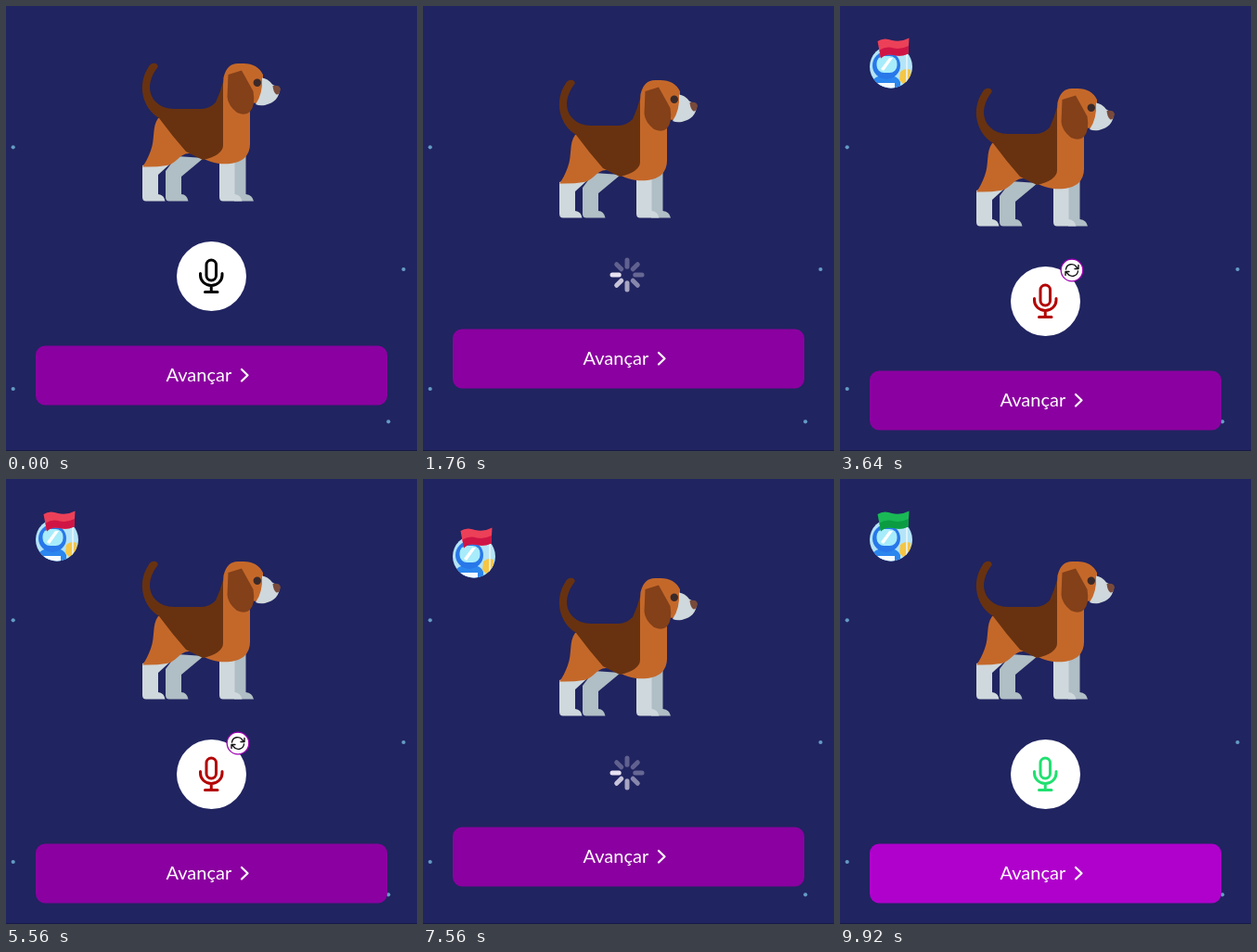
An HTML page for the animation above (10000 ms loop, 443 px wide and 480 px high).

```html
<!DOCTYPE html>
<html lang="pt">
<head>
<meta charset="utf-8">
<title>Avançar</title>
<style>
  html, body { margin: 0; width: 100%; height: 100%; overflow: hidden; background: #202460; }
  svg { display: block; width: 443px; height: 480px; }
  text { font: 20px Lato, "Open Sans", sans-serif; fill: #fff; }
  .line { fill: none; stroke-linecap: round; stroke-linejoin: round; }
</style>
</head>
<body>
<svg viewBox="0 0 443 480">
  <rect width="443" height="480" fill="#202460"/>
  <rect y="479" width="443" height="1" fill="#171a45"/>
  <g fill="#649bc4">
    <circle cx="7.7" cy="152.3" r="2.1"/>
    <circle cx="428.5" cy="284" r="2.1"/>
    <circle cx="7.7" cy="413" r="2.1"/>
    <circle cx="412.2" cy="448.3" r="2.1"/>
  </g>

  <g id="avatar">
    <clipPath id="disc"><circle cx="55" cy="65.5" r="23"/></clipPath>
    <g clip-path="url(#disc)">
      <rect x="30" y="40" width="50" height="50" fill="#b4e4f8"/>
      <path d="M34 90V82Q38 74 50 75Q62 74 65 82V90Z" fill="#2b86ee"/>
      <path d="M39 90V83H59V90Z" fill="#f4fbff"/>
      <circle cx="50" cy="64" r="15" fill="#2878ea"/>
      <rect x="39.5" y="54" width="22" height="18" rx="8" fill="#a7ecfb"/>
      <path d="M44 68L53 56H57L47 70Z" fill="#fff"/>
      <path d="M65 71Q70 66 76 69V79L68 84L64 80Z" fill="#f6c644"/>
      <path d="M72 50V82" stroke="#e9f4fa" stroke-width="1.6"/>
    </g>
    <path id="flag" d="M40.500 38Q47 33.500 56 37Q65 39.500 74.500 34.500L73.500 51.500Q66 55 58 53Q49 51 44 56.500Z"/>
    <path id="fold" d="M42.500 47.500Q50 43 58 45.500Q66 47 74 43L73.500 51.500Q66 55 58 53Q49 51 44 56.500Z"/>
  </g>

  <g id="dog">
    <path fill="#b0bec5" d="M184 162L213 164L189 184V203Q195 203 196.500 210.500H176Q172 210.500 172 206V178Z"/>
    <path fill="#cfd8dc" d="M147 172L186 160L175 172L164 182V203Q170.500 203.500 171.500 210.500H151Q147 210.500 147 206Z"/>
    <path fill="#b0bec5" d="M244 158H258.500V203Q265.500 203.500 267 210.500H246Z"/>
    <path fill="#cfd8dc" d="M230 162H246.500V203Q253 203.500 254.500 210.500H234Q230 210.500 230 206Z"/>
    <path fill="#c4682a" d="M164 121C157 131 161 143 156 156Q152 167 147 173.500Q162 174 173 172C183 171 187 159 197 159C205 159 211 165 221 168C233 172 249 171 257 164Q263 158 263 149V104L277 106V74Q271 62 256 62H250Q238 62 234.500 77L232 112Z"/>
    <path fill="#683210" d="M163.500 66C152 81 153 95 162 104Q169 111 181 111H211Q219 111 226 104Q231 93 234 82V150Q234 161 212 166L194 157Q179 140 165 121C147 110 141 85 153.500 66C157 59 165 62 163.500 66Z"/>
    <path fill="#cfd8dc" d="M276 77.500Q282 78 287 84.500L295 89Q295 103 279 107Q273 108 269 106Q277 95 276 77.500Z"/>
    <path fill="#834019" d="M239.500 74L254 69.500L266.500 92Q269 107 263 114Q258 119 249 115Q239 107 238.500 98Z"/>
    <path fill="#784a3b" d="M287.500 86Q295.500 84.500 296 90Q294.500 96 291.500 95.500Q288 93 287.500 86Z"/>
    <circle cx="270.800" cy="82.800" r="4.200" fill="#3b2a2a"/>
  </g>

  <g id="mic">
    <circle r="37.500" fill="#fff"/>
    <g id="icon" class="line" stroke-width="3">
      <rect x="-5.500" y="-17.500" width="10.500" height="22" rx="5.250"/>
      <path d="M-12 -3V-1A11.750 11 0 0 0 11.500 -1V-3M-.25 10V17M-7 17H6.500"/>
    </g>
  </g>

  <g id="badge" transform="translate(250 285)">
    <circle r="11.800" fill="#fff" stroke="#a000b4" stroke-width="1.300"/>
    <g class="line" stroke="#111" stroke-width="1.400">
      <path id="arrow" d="M-6.500 -1A6.200 6.200 0 0 1 4.800 -3.600L6.500 -1.800M7 -5.500V-1.500H3"/>
      <use href="#arrow" transform="rotate(180)"/>
    </g>
  </g>

  <g id="spinner" class="line" stroke="#f4eefb" stroke-width="5"></g>

  <g id="button">
    <rect id="plate" x="32" y="366.500" width="379" height="64" rx="10"/>
    <text x="172.500" y="404.500">Avançar</text>
    <path class="line" d="M254 392L260.500 398.200L254 404.500" stroke="#fff" stroke-width="2.200"/>
  </g>
</svg>

<script>
const LOOP = 10000, TURN = 800, SPOKES = 8;
const $ = id => document.getElementById(id);

// Offsets are relative to the idle layout; mic is [y, scale, colour].
const states = [
  { at: 0, dog: 0, button: 0, mic: [291.5, 1, "#000"] },
  { at: 40, dog: -18.75, button: 18.75, mic: [291.5, 1.5, "#000"] },
  { at: 1120, dog: 18, button: -18, spin: [290, 1120] },
  { at: 3200, dog: 27, button: 27, mic: [318.5, 1, "#b30000"], avatar: 0, badge: true },
  { at: 5600, dog: 8.25, button: 45.75, mic: [318.5, 1.5, "#000"], avatar: -18.75 },
  { at: 7240, dog: 45, button: 9, spin: [317, 6920], avatar: 18 },
  { at: 9240, dog: 27, button: 27, mic: [318.5, 1, "#20e070"], avatar: 0, passed: true }
];

const spokes = Array.from({ length: SPOKES }, (_, i) => {
  const line = document.createElementNS("http://www.w3.org/2000/svg", "path");
  line.setAttribute("d", "M0 -8.800V-16");
  line.setAttribute("transform", `rotate(${i * 360 / SPOKES})`);
  return $("spinner").appendChild(line);
});

const show = (id, on) => $(id).setAttribute("display", on ? "inline" : "none");
const shift = (id, y, x = 0, extra = "") =>
  $(id).setAttribute("transform", `translate(${x} ${y}) ${extra}`);

function apply(s) {
  shift("dog", s.dog);
  shift("button", s.button);
  show("mic", s.mic);
  show("spinner", s.spin);
  show("badge", s.badge);
  show("avatar", s.avatar !== undefined);
  if (s.mic) {
    shift("mic", s.mic[0], 221.5, `scale(${s.mic[1]})`);
    $("icon").setAttribute("stroke", s.mic[2]);
  }
  if (s.spin) shift("spinner", s.spin[0], 220);
  if (s.avatar !== undefined) shift("avatar", s.avatar);
  $("plate").setAttribute("fill", s.passed ? "#b000cc" : "#8b00a0");
  $("flag").setAttribute("fill", s.passed ? "#19b955" : "#ec4058");
  $("fold").setAttribute("fill", s.passed ? "#0b9c42" : "#cf1545");
}

function turn(t, start) {
  const lead = (t - start) / TURN * SPOKES;
  spokes.forEach((line, i) => {
    const age = ((lead - i) % SPOKES + SPOKES) % SPOKES;
    line.setAttribute("opacity", Math.max(0.3, 1 - 0.15 * age));
  });
}

let current;
const begin = performance.now();

function draw(now) {
  const t = Math.max(0, now - begin) % LOOP;
  const s = states.findLast(x => x.at <= t);
  if (s !== current) apply(current = s);
  if (s.spin) turn(t, s.spin[1]);
  requestAnimationFrame(draw);
}
draw(begin);
</script>
</body>
</html>
```
